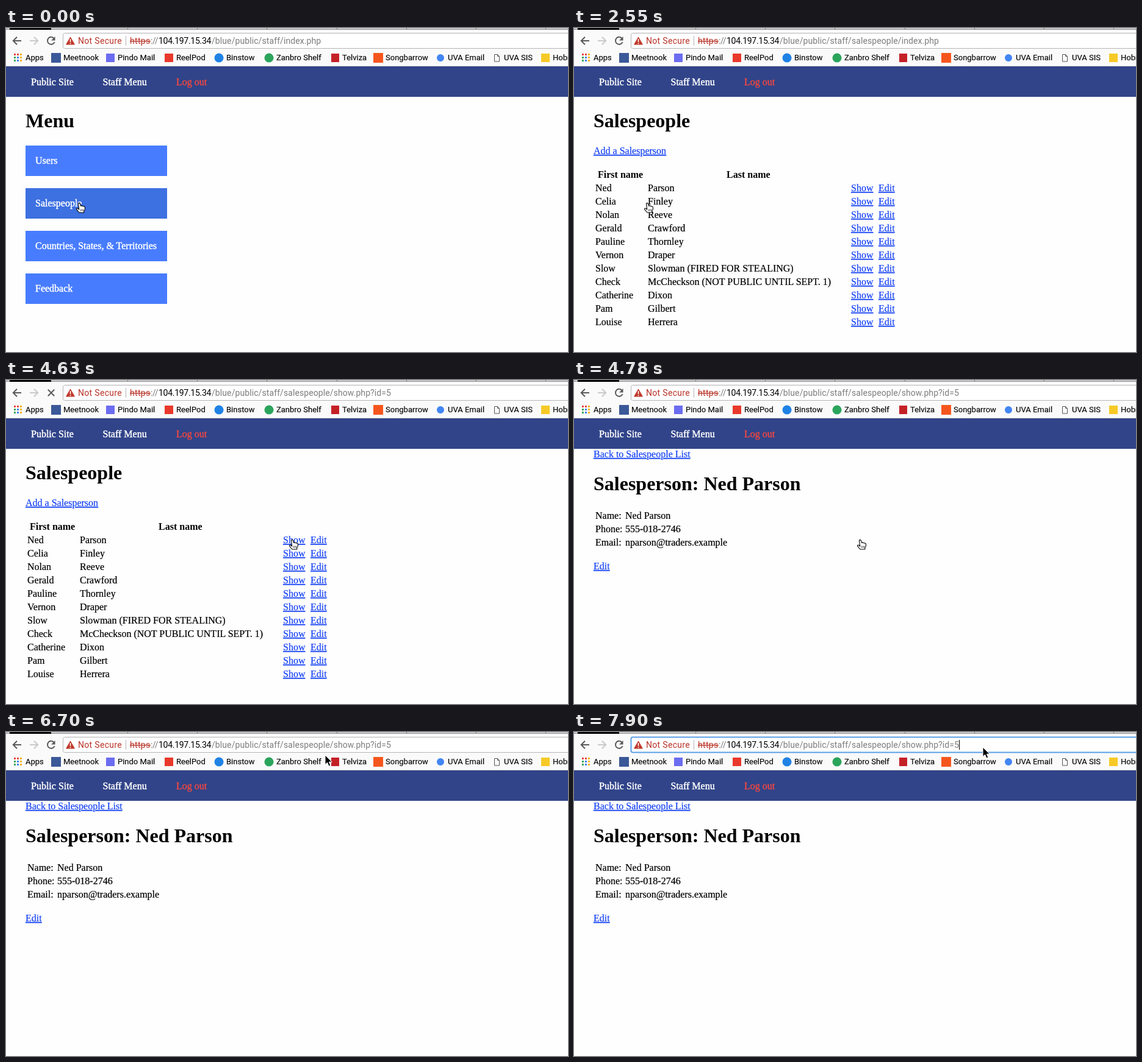
Animation, 921 px wide and 532 px high, one loop 8000 ms. Source, as an HTML page:

```html
<!DOCTYPE html>
<html lang="en">
<head>
<meta charset="utf-8">
<title>Staff menu</title>
<style>
html, body { margin: 0; width: 100%; height: 100%; overflow: hidden; background: #fefefe; }
svg { display: block; width: 921px; height: 532px; }
text { white-space: pre; }
.ui { font: 13px Roboto, sans-serif; fill: #000; stroke: #000; stroke-width: .12px; }
.url { font: 14px Roboto, sans-serif; fill: #7c7c7c; }
.page { font: 16px "Liberation Serif", serif; fill: #000; }
.page text { stroke: #000; stroke-width: .22px; }
.page .bold { font-weight: bold; stroke: none; }
.page .title { font-size: 32px; font-weight: bold; stroke: none; }
.page .link { fill: #1542f5; stroke: #1542f5; text-decoration: underline 1.2px; text-underline-offset: 1px; }
.page .light { fill: #fff; stroke: #fff; stroke-width: .45px; }
.page .exit { fill: #f4483f; stroke: #f4483f; stroke-width: .35px; }
.alert { fill: #b93227; }
</style>
</head>
<body>
<svg id="stage" viewBox="0 0 921 532" xmlns="http://www.w3.org/2000/svg"></svg>
<script>
const LOOP = 8000;
const text = (x, y, s, cls = '', extra = '') => `<text x="${x}" y="${y}" class="${cls}" ${extra}>${s}</text>`;
const rect = (x, y, w, h, fill, extra = '') => `<rect x="${x}" y="${y}" width="${w}" height="${h}" fill="${fill}" ${extra}/>`;
const dot = (x, y, r, fill) => `<circle cx="${x}" cy="${y}" r="${r}" fill="${fill}"/>`;
const line = (d, color, w) => `<path d="${d}" fill="none" stroke="${color}" stroke-width="${w}"/>`;
const group = (id, body, cls = '') => `<g id="${id}" class="${cls}">${body}</g>`;

function tabStrip() {
  let s = rect(0, 0, 921, 2, '#cac7cb') + rect(0, 2, 921, 1, '#969397') + rect(6, 0, 68, 3, '#000');
  for (let i = 1; i < 8; i++) s += rect(85 + Math.round(i * 114.15), 0, 1, 2, '#777478');
  return s;
}

function bookmarks() {
  const colors = ['#e8453c', '#e8453c', '#f3b21b', '#3aa757', '#4285f4', '#f3b21b', '#3aa757', '#4285f4', '#f3b21b'];
  let s = colors.map((c, i) => rect(13 + i % 3 * 5, 42 + (i / 3 | 0) * 5, 3, 3, c)).join('');
  s += rect(74, 41, 16, 16, '#3b5998') + rect(164, 42, 14, 14, '#6b6cf0')
    + rect(260, 42, 14, 14, '#e8392c') + dot(349, 49, 7.5, '#1f82e5')
    + dot(431, 49, 7.5, '#2ba45c') + rect(533, 42, 13, 14, '#c42127')
    + rect(602, 41, 16, 16, '#f5561d') + dot(712, 49, 6, '#4285f4') + rect(877, 42, 14, 14, '#f6c927');
  s += line('M800.5 43.5h5l3 3v8.5h-8zM805.5 43.5v3h3', '#555', 1);
  const names = [[32, 'Apps'], [94, 'Meetnook'], [183, 'Pindo Mail'], [279, 'ReelPod'], [361, 'Binstow'],
    [443, 'Zanbro Shelf'], [551, 'Telviza'], [622, 'Songbarrow'], [724, 'UVA Email'], [816, 'UVA SIS'], [896, 'Hobnet']];
  return group('icons', s) + group('names', names.map(([x, n]) => text(x, 53, n)).join(''), 'ui');
}

function toolbar() {
  return rect(0, 3, 921, 60, '#fafafa') + rect(0, 62, 921, 1, '#d2d2d2') + tabStrip()
    + line('M25 21H12.5M18 14.8 11.8 21 18 27.2', '#5a5a5a', 2)
    + line('M39 21H51.5M46 14.8 52.2 21 46 27.2', '#c9c9c9', 2)
    + group('reload', line('M78.6 17A6 6 0 1 0 79.6 23', '#5a5a5a', 2) + '<path d="M80.5 14v6.5h-6.5z" fill="#5a5a5a"/>')
    + group('stop', line('M68.8 15.8 79.2 26.2M79.2 15.8 68.8 26.2', '#5a5a5a', 2))
    + rect(93.5, 8.5, 840, 25, '#fff', 'id="field" rx="3"')
    + rect(203, 12, 429, 17, '#b3d5fd', 'id="selection"')
    + '<path d="M105.5 15 112.3 27H98.7z" fill="#c0392b" stroke="#c0392b" stroke-linejoin="round"/>'
    + rect(104.7, 18, 1.6, 5, '#fff') + rect(104.7, 24.3, 1.6, 1.7, '#fff')
    + text(118, 26, 'Not Secure', 'url alert', 'letter-spacing=".32"')
    + rect(196, 13, 1, 16, '#b8b8b8')
    + text(203, 26, 'https', 'url alert', 'letter-spacing=".3"') + rect(203, 21, 34, 1.3, '#b93227')
    + text(237, 26, '://', 'url', 'letter-spacing="-.5"')
    + text(250, 26, '104.197.15.34', 'url', 'style="fill:#000" letter-spacing="-.28"')
    + text(337, 26, '', 'url', 'id="path" letter-spacing=".09"')
    + rect(631, 13, 1, 16, '#000', 'id="caret"')
    + bookmarks();
}

function navBar() {
  return rect(0, 63, 921, 50, '#314489') + text(41, 94, 'Public Site', 'light')
    + text(158.5, 94, 'Staff Menu', 'light') + text(279, 94, 'Log out', 'exit');
}

function menuPage() {
  const items = ['Users', 'Salespeople', 'Countries, States, &amp; Territories', 'Feedback'];
  return text(32, 163, 'Menu', 'title') + items.map((n, i) =>
    rect(32, 193 + 70 * i, 232, 50, '#487cff', `id="item${i}"`) + text(48, 223 + 70 * i, n, 'light')).join('');
}

function listPage() {
  const people = ['Ned,Parson', 'Celia,Finley', 'Nolan,Reeve', 'Gerald,Crawford', 'Pauline,Thornley', 'Vernon,Draper',
    'Slow,Slowman (FIRED FOR STEALING)', 'Check,McCheckson (NOT PUBLIC UNTIL SEPT. 1)',
    'Catherine,Dixon', 'Pam,Gilbert', 'Louise,Herrera'];
  return text(32, 163, 'Salespeople', 'title') + text(32, 207, 'Add a Salesperson', 'link')
    + text(39, 246, 'First name', 'bold') + text(250, 246, 'Last name', 'bold')
    + people.map((p, i) => {
      const y = 268 + 22 * i, [first, last] = p.split(',');
      return text(35, y, first) + text(121, y, last) + text(454, y, 'Show', 'link') + text(499, y, 'Edit', 'link');
    }).join('');
}

function personPage() {
  const rows = [['Name:', 'Ned Parson'], ['Phone:', '555-018-2746'], ['Email:', 'nparson@traders.example']];
  return text(32, 127, 'Back to Salespeople List', 'link') + text(32, 181, 'Salesperson: Ned Parson', 'title')
    + rows.map(([k, v], i) => text(35, 228 + 22 * i, k) + text(84, 228 + 22 * i, v)).join('')
    + text(32, 311, 'Edit', 'link');
}

const arrow = '<path d="M0 0V15.5L3.6 12.2 6 18 8.8 16.8 6.4 11.2H11.2z" fill="#000" stroke="#fff"/>';
const hand = '<path d="M-1.5 1.6C-1.5 0 1 0 1.4 1.6L2.4 5.2C3 4.3 4.5 4.5 4.9 5.6 5.6 4.9 7 5.2 7.3 6.2 8.2 5.7 9.3 6.2 9.4 7.5L9.3 11 7.8 13.5V16H0L-4.3 10.8C-5 9.5-3.6 8.4-2.4 9.3L-.3 11z" fill="#fff" stroke="#000" stroke-width="1.1" stroke-linejoin="round"/>'
  + line('M2.2 10.5V13.5M4.4 10.5V13.5M6.5 10.5V13.5', '#000', .8);

const stage = document.getElementById('stage');
stage.innerHTML = rect(0, 0, 921, 532, '#fefefe') + toolbar()
  + group('body', navBar() + group('menu', menuPage()) + group('list', listPage()) + group('person', personPage()), 'page')
  + group('arrow', arrow) + group('hand', hand);

const el = id => document.getElementById(id);
const show = (id, on) => el(id).setAttribute('display', on ? 'inline' : 'none');

// Pointer stops: time, x, y, shape
const stops = [
  [0, 120, 287, 'hand'],
  [3000, 240, 286, 'arrow'], [3140, 409, 273, 'arrow'],
  [3440, 428, 273, 'arrow'], [3590, 445, 271, 'arrow'], [3740, 460, 266, 'hand'], [3880, 469, 262, 'hand'],
  [5070, 440, 246, 'arrow'], [5220, 345, 220, 'arrow'], [5370, 215, 217, 'arrow'],
  [5520, 115, 252, 'arrow'], [5670, 62, 284, 'arrow'], [5820, 54, 292, 'arrow'],
  [6120, 68, 280, 'arrow'], [6270, 150, 226, 'arrow'], [6420, 302, 138, 'arrow'], [6560, 442, 72, 'arrow'],
  [6700, 523, 38, 'arrow'], [6850, 600, 27, 'arrow'], [7000, 645, 22, 'arrow'], [7150, 665, 21, 'arrow'],
  [7300, 670, 25, 'arrow']
];

function render(t) {
  const within = (a, b) => t >= a && t < b;
  show('menu', t < 2550);
  show('list', within(2550, 4780));
  show('person', t >= 4780);
  el('item1').setAttribute('fill', t < 2100 ? '#3d70e1' : '#3362c8');

  const loading = within(2250, 2550) || within(4480, 4780);
  show('reload', !loading);
  show('stop', loading);
  el('path').textContent = '/blue/public/staff/' + (t < 2550 ? 'index.php'
    : t < 4630 ? 'salespeople/index.php' : 'salespeople/show.php?id=5');

  const focus = t >= 7300;
  el('field').setAttribute('stroke', focus ? '#5b9fe6' : '#b4b4b4');
  el('field').setAttribute('stroke-width', focus ? 2 : 1);
  show('selection', within(7450, 7900));
  show('caret', t >= 7900);

  const [, x, y, shape] = stops.filter(s => s[0] <= t).pop();
  for (const id of ['arrow', 'hand']) {
    show(id, id === shape);
    el(id).setAttribute('transform', `translate(${x} ${y})`);
  }
}

const start = performance.now();
function tick() {
  render((performance.now() - start) % LOOP);
  requestAnimationFrame(tick);
}
render(0);
requestAnimationFrame(tick);
</script>
</body>
</html>
```
